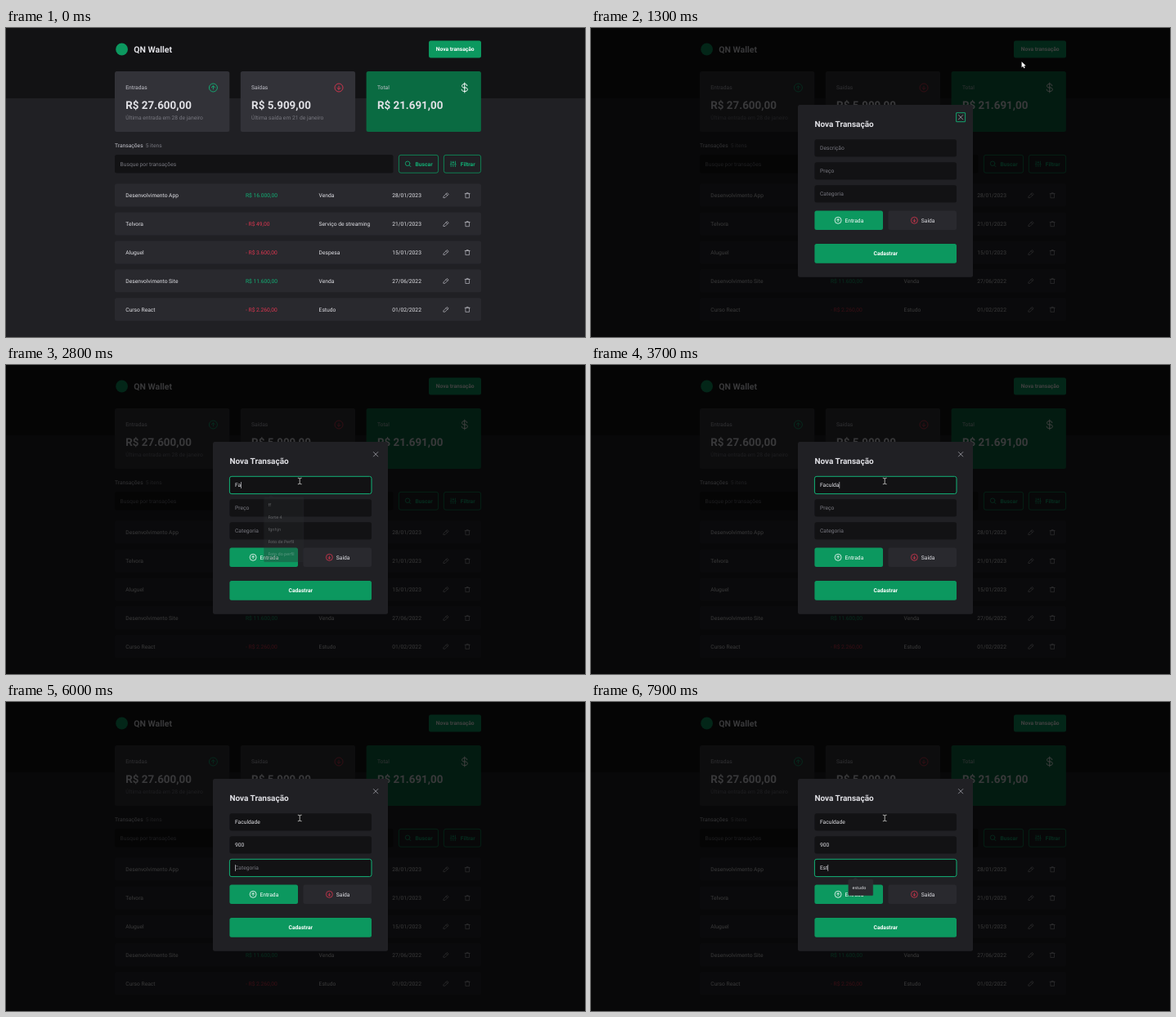
Write an HTML page with a canvas that moves like this. It is 708 px wide and 378 px high and loops after 8000 ms.

```html
<!DOCTYPE html>
<html lang="pt-BR">
<head>
<meta charset="utf-8">
<title>Transações</title>
<style>
html, body { margin: 0; width: 100%; height: 100%; overflow: hidden; background: #202024; }
canvas { display: block; width: 708px; height: 378px; }
</style>
</head>
<body>
<canvas id="stage"></canvas>
<script>
const W = 708, H = 378, LOOP = 8000;
const canvas = document.getElementById('stage');
const ctx = canvas.getContext('2d');
const dpr = window.devicePixelRatio || 1;
canvas.width = W * dpr;
canvas.height = H * dpr;

const C = {
  ink: '#121214', page: '#202024', row: '#29292e', card: '#323238',
  green: '#0c985f', deep: '#0a6b42', bright: '#12b176', red: '#dc3650',
  text: '#e1e1e6', soft: '#c4c4cc', mute: '#77777f', white: '#ffffff'
};
const BASE = 6.7;

// Key presses: time, field index, field value
const KEYS = [
  [1900, 0, ''], [2500, 0, 'F'], [2700, 0, 'Fa'], [3100, 0, 'Fac'],
  [3400, 0, 'Facu'], [3500, 0, 'Facul'], [3600, 0, 'Faculd'],
  [3700, 0, 'Faculda'], [3800, 0, 'Faculdade'],
  [4100, 1, ''], [5100, 1, '9'], [5200, 1, '90'], [5400, 1, '900'],
  [6000, 2, ''], [6200, 2, ''], [7500, 2, 'E'], [7700, 2, 'Es'], [7900, 2, 'Est']
];
const FIELDS = [['Descrição', 147], ['Preço', 175], ['Categoria', 203]];
const ROWS = [
  ['Desenvolvimento App', 'R$ 16.000,00', 'Venda', '28/01/2023'],
  ['Telvora', '- R$ 49,00', 'Serviço de streaming', '21/01/2023'],
  ['Aluguel', '- R$ 3.600,00', 'Despesa', '15/01/2023'],
  ['Desenvolvimento Site', 'R$ 11.600,00', 'Venda', '27/06/2022'],
  ['Curso React', '- R$ 2.260,00', 'Estudo', '01/02/2022']
];
const HINTS = ['ff', 'Forte 4', 'fgnhjn', 'Foto de Perfil', 'Foto do perfil'];
const KINDS = ['Alimentação', 'Anime', 'Venda', 'estudo', 'Despesa', 'An'];

const ICONS = {
  pencil: 'M-3 1.3L1.2 -2.9L2.9 -1.2L-1.3 3H-3ZM-.1 -1.6L1.6 .1',
  trash: 'M-3 -2.1H3M-2.3 -2.1V3H2.3V-2.1M-1 -2.1V-3.1H1V-2.1',
  search: 'M2.4 -.5A2.8 2.8 0 1 1 -3.2 -.5A2.8 2.8 0 1 1 2.4 -.5M1.6 1.5L3.5 3.4',
  sliders: 'M-2.6 -3.2V.4M-2.6 2V3.2M0 -3.2V-2M0 -.4V3.2M2.6 -3.2V.4M2.6 2V3.2M-3.5 .6H-1.7M-.9 -1.8H.9M1.7 .6H3.5',
  dollar: 'M0 -6V6M3 -2.3C3 -3.6 2.1 -4.4 .8 -4.4H-.8C-2.2 -4.4 -3.2 -3.4 -3.2 -2.2S-2.2 0 -.8 0H1.2C2.6 0 3.5 1 3.5 2.2S2.6 4.4 1.2 4.4H-1.2C-2.6 4.4 -3.6 3.4 -3.6 2.2',
  cross: 'M-2.7 -2.7L2.7 2.7M2.7 -2.7L-2.7 2.7',
  beam: 'M-2 -3.8Q0 -3.8 0 -2.8Q0 -3.8 2 -3.8M0 -2.8V2.8M-2 3.8Q0 3.8 0 2.8Q0 3.8 2 3.8',
  arrow: 'M0 0V7.2L1.7 5.7L2.8 8.2L4 7.7L2.9 5.2H5.2Z'
};
const paths = Object.fromEntries(Object.entries(ICONS).map(([k, d]) => [k, new Path2D(d)]));

function text(str, x, cy, color = C.text, size = BASE, weight = 400, align = 'left', family = 'Roboto') {
  ctx.font = `${weight} ${size}px ${family}, sans-serif`;
  ctx.textAlign = align;
  ctx.fillStyle = color;
  ctx.fillText(str, x, cy + size * 0.356);
}

function box(x, y, x2, y2, fill, stroke, line = 0.8, r = 2.5) {
  ctx.beginPath();
  ctx.roundRect(x, y, x2 - x, y2 - y, r);
  if (fill) { ctx.fillStyle = fill; ctx.fill(); }
  if (stroke) { ctx.strokeStyle = stroke; ctx.lineWidth = line; ctx.stroke(); }
}

function icon(name, x, y, color, line = 0.65) {
  ctx.save();
  ctx.translate(x, y);
  ctx.strokeStyle = color;
  ctx.lineWidth = line;
  ctx.lineCap = ctx.lineJoin = 'round';
  ctx.stroke(paths[name]);
  ctx.restore();
}

function roundArrow(x, y, r, dir, color, line = 0.9) {
  const a = r * 0.46;
  ctx.strokeStyle = color;
  ctx.lineWidth = line;
  ctx.beginPath();
  ctx.arc(x, y, r, 0, 7);
  ctx.moveTo(x, y - dir * a);
  ctx.lineTo(x, y + dir * a);
  ctx.moveTo(x - a, y);
  ctx.lineTo(x, y + dir * a);
  ctx.lineTo(x + a, y);
  ctx.stroke();
}

function drawCard(x, label, value, note, fill) {
  box(x, 53, x + 140.3, 127, fill);
  text(label, x + 13.3, 73, C.soft);
  text(value, x + 13.3, 94.2, C.text, 13.4, 700);
  if (note) text(note, x + 13.3, 109.5, C.mute);
}

function drawPage(t) {
  ctx.fillStyle = C.page;
  ctx.fillRect(0, 0, W, H);
  ctx.fillStyle = C.ink;
  ctx.fillRect(0, 0, W, 86);

  ctx.fillStyle = C.green;
  ctx.beginPath();
  ctx.arc(141.6, 26, 7.4, 0, 7);
  ctx.fill();
  text('QN Wallet', 156.3, 26, C.text, 10.5, 700);

  const hover = t >= 900 && t < 1300;
  box(517, 15.5, 581, 36.5, hover ? C.deep : C.green);
  if (t >= 1100 && t < 1300) box(516.7, 15, 581.4, 37, null, C.green, 1);
  text('Nova transação', 549.2, 26, C.white, BASE, 700, 'center');

  drawCard(133, 'Entradas', 'R$ 27.600,00', 'Última entrada em 28 de janeiro', C.card);
  drawCard(286.8, 'Saídas', 'R$ 5.909,00', 'Última saída em 21 de janeiro', C.card);
  drawCard(440.6, 'Total', 'R$ 21.691,00', '', C.deep);
  roundArrow(253.4, 73, 5, -1, C.bright);
  roundArrow(407, 73, 5, 1, C.red);
  icon('dollar', 560.8, 73, C.white, 1);

  text('Transações', 133, 144, C.soft);
  text('5 itens', 170.7, 144, C.mute);
  box(133, 155, 473.5, 177.5, C.ink);
  text('Busque por transações', 139.6, 166.3, C.mute);
  box(480.4, 155.4, 528.6, 177.2, null, C.green);
  icon('search', 491.5, 166.3, C.bright, 0.8);
  text('Buscar', 500.6, 166.3, C.bright, BASE, 700);
  box(535.4, 155.4, 580.6, 177.2, null, C.green);
  icon('sliders', 546.8, 166.3, C.bright, 0.8);
  text('Filtrar', 555.8, 166.3, C.bright, BASE, 700);

  ROWS.forEach(([name, price, kind, date], i) => {
    const y = 204.6 + i * 34.9;
    box(133, y - 14, 581, y + 14, C.row);
    text(name, 146.3, y);
    text(price, 293, y, price[0] === '-' ? C.red : C.bright);
    text(kind, 382.6, y);
    text(date, 472.3, y);
    icon('pencil', 538.2, y, C.soft);
    icon('trash', 564.2, y + 0.2, C.soft);
  });
}

function drawPopup(items, x, top, right, alpha = 1) {
  const bottom = top + items.length * 14.9 + 4.4;
  ctx.save();
  ctx.globalAlpha = alpha;
  ctx.fillStyle = '#2a2b2f';
  ctx.beginPath();
  ctx.moveTo(x + 4.5, top + 0.5);
  ctx.lineTo(x + 8.5, top - 2.8);
  ctx.lineTo(x + 12.5, top + 0.5);
  ctx.fill();
  box(x, top, right, bottom, '#2a2b2f', '#37383c', 0.4, 1);
  items.forEach((s, i) => text(s, x + 4.8, top + 9.6 + i * 15, '#e8eaed', 5.15, 400, 'left', "'Noto Sans'"));
  ctx.restore();
}

function drawSpinner(x, y) {
  box(x, y - 4, x + 6.4, y + 4, '#ececee', null, 0, 0.6);
  ctx.fillStyle = '#3a3a3e';
  for (const d of [-1, 1]) {
    ctx.beginPath();
    ctx.moveTo(x + 1.7, y + d);
    ctx.lineTo(x + 4.7, y + d);
    ctx.lineTo(x + 3.2, y + d * 2.8);
    ctx.fill();
  }
}

function drawModal(t) {
  ctx.fillStyle = 'rgba(0,0,0,.75)';
  ctx.fillRect(0, 0, W, H);
  box(253, 94, 467, 304.7, C.page);
  text('Nova Transação', 273.4, 117.2, C.text, 10, 700);
  icon('cross', 452.1, 109.2, '#a0a0a8', 0.8);
  if (t < 1900) box(446.6, 103.7, 457.6, 114.7, null, C.bright, 0.9, 0.3);

  const values = ['', '', ''];
  let focus = -1, pressed = 0;
  for (const [at, field, value] of KEYS) {
    if (at > t) break;
    values[field] = value;
    focus = field;
    pressed = at;
  }
  FIELDS.forEach(([hint, y], i) => {
    const on = i === focus;
    box(273.4, y - 10.7, 447, y + 10.6, C.ink, on && C.bright, 1);
    text(values[i] || hint, 280, y, values[i] ? C.text : C.mute);
    if (!on) return;
    if ((t - pressed) % 1000 < 500) {
      const w = values[i] ? ctx.measureText(values[i]).width : 0;
      ctx.fillStyle = C.text;
      ctx.fillRect(280.1 + w, y - 4, 0.6, 8);
    }
    if (i === 1) drawSpinner(434, y);
  });

  box(273.4, 223.5, 357, 247, C.green);
  roundArrow(302.1, 235.3, 4, -1, C.white, 0.8);
  text('Entrada', 310.4, 235.3, C.white);
  box(363.5, 223.5, 447, 247, C.row);
  roundArrow(395.4, 235.3, 4, 1, C.red, 0.8);
  text('Saída', 403.8, 235.3);
  box(273.4, 264, 447, 287.8, C.green);
  text('Cadastrar', 360.3, 276, C.white, BASE, 700, 'center');

  if (t >= 2500 && t < 2900) drawPopup(HINTS, 315.6, 161.8, 364, Math.min(1, (2865 - t) / 185));
  if (t >= 6100 && t < 7600) drawPopup(KINDS, 314.8, 217.4, 359.8);
  if (t >= 7600) drawPopup(['estudo'], 314.8, 217.4, 344.8);
}

function drawCursor(t) {
  if (t < 100) return;
  if (t >= 1800) {
    icon('beam', 359.2, 142, '#111', 1.7);
    icon('beam', 359.2, 142, '#d8d8d8', 0.8);
    return;
  }
  let x = 540, y = 28.2;
  if (t < 900) {
    const k = 1 - ((t - 100) / 800 - 1) ** 2;
    x = 400 + 140 * k;
    y = 372 - 343.8 * k;
  } else if (t > 1200) {
    const p = (t - 1200) / 600;
    const k = p * p * (3 - 2 * p);
    x = 540 - 180.8 * k;
    y = 28.2 + 113.8 * k + 9 * Math.sin(p * Math.PI);
  }
  ctx.save();
  ctx.translate(x, y);
  ctx.strokeStyle = '#111';
  ctx.lineWidth = 0.9;
  ctx.stroke(paths.arrow);
  ctx.fillStyle = C.white;
  ctx.fill(paths.arrow);
  ctx.restore();
}

function frame(now) {
  const t = Math.floor((now % LOOP) / 100) * 100;
  ctx.setTransform(dpr, 0, 0, dpr, 0, 0);
  ctx.textRendering = 'geometricPrecision';
  drawPage(t);
  if (t >= 1300) drawModal(t);
  drawCursor(t);
  requestAnimationFrame(tick);
}

let start;
function tick(now) {
  start ??= now;
  frame(now - start);
}
requestAnimationFrame(tick);
</script>
</body>
</html>
```
